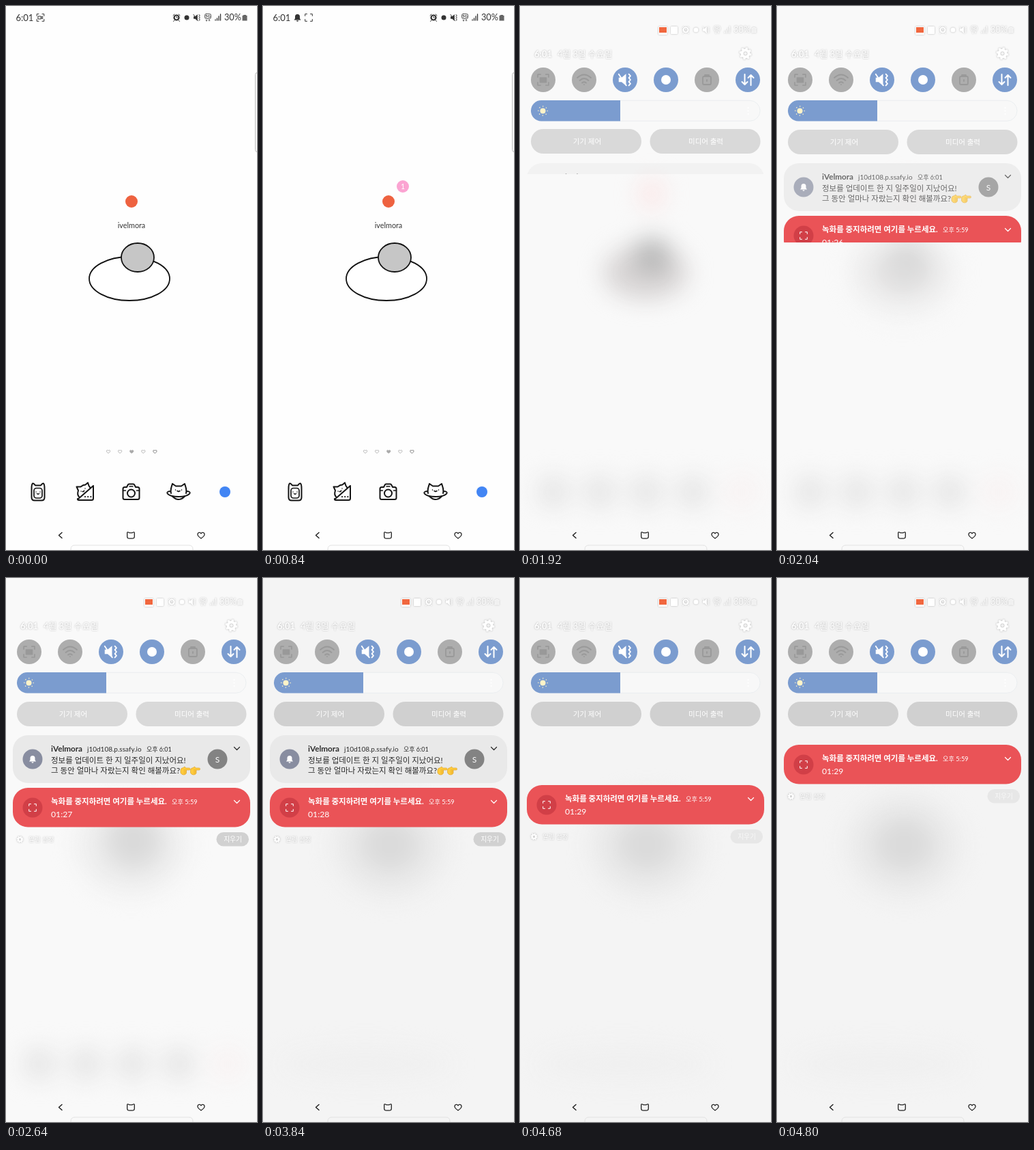
Recreate the animation shown at these times as an HTML page. Size 368 px wide and 796 px high, loop 4920 ms.

```html
<!DOCTYPE html>
<html lang="ko">
<head>
<meta charset="utf-8">
<style>
  html, body { margin: 0; height: 100%; overflow: hidden; background: #fefefe; }
  svg { display: block; width: 100vw; height: 100vh; }
  text { font-family: Lato, "Noto Sans CJK KR", sans-serif; fill: currentColor; }
  .line { fill: none; stroke: currentColor; stroke-linecap: round; stroke-linejoin: round; }
  .fill { fill: currentColor; }
  .mid { text-anchor: middle; }
  .pale { color: #fff; filter: drop-shadow(0 0 1px #b0b0b0); }
  .soft { filter: blur(17px); }
</style>
</head>
<body>
<svg viewBox="0 0 368 796">
  <defs>
    <path id="heart" d="M0 4.500C-4 2-5.500.5-5-2C-4.300-4.800-1-4.500 0-2.500C1-4.500 4.300-4.800 5-2C5.500.5 4 2 0 4.500z"/>
    <path id="bell" class="fill" d="M-5 3.500h10l-1.500-2.300v-2.700a3.500 3.500 0 0 0-7 0v2.700zM-1.500 4.200h3a1.500 1.500 0 0 1-3 0z"/>
    <path id="corners" class="line" d="M-5.300-2.500v-2.800h2.800M2.500-5.300h2.800v2.800M5.300 2.500v2.800h-2.800M-2.500 5.300h-2.800v-2.800"/>
    <path id="camera" class="line" d="M-3.200-2h4v4h-4zM.8-.5l2.400-1.300v3.600l-2.400-1.300"/>
    <g id="mute">
      <path class="fill" d="M-5-1.700h2.300l3.500-3v9.400l-3.500-3h-2.300z"/>
      <path class="line" d="M-5-4.500L1 4.500M3-4.500l1.300 1.500-1.300 1.500 1.300 1.500-1.300 1.500 1.300 1.500-1.300 1.500"/>
    </g>
    <g id="gear" fill="none" stroke="currentColor">
      <circle r="7.500" stroke-width="3" stroke-dasharray="3 2.890"/>
      <circle r="5" stroke-width="4"/>
    </g>
    <g id="hand" fill="#ffcb3d" stroke="#d99b22" stroke-width=".6">
      <path d="M0 4Q0 1 4 .5L6-1l1.500 2h5q1.500 0 1.500 1.500t-1.500 1.500h-4v4.500q-1 2.500-4 2.500T0 8z"/>
      <path d="M4.500 4h4M4.500 6.200h4M4.500 8.400h3.700"/>
    </g>
    <path id="chevron" class="line" d="M-4-2l4 4 4-4" stroke-width="1.200"/>
    <g id="status">
      <circle class="line" r="3.500" stroke-width="2.200"/>
      <path class="line" d="M0-1.500v1.500h1.200M-5-3l2-2M5-3l-2-2M-3 4l-1.500 1.500M3 4l1.500 1.500"/>
      <circle class="fill" cx="15" r="3.500"/>
      <use href="#mute" x="30"/>
      <rect class="line" x="41.500" y="-5.500" width="9" height="7" rx="2" stroke-width=".8"/>
      <text class="mid" x="46" y=".3" font-size="6" font-weight="700">5G</text>
      <path class="line" d="M44 3v2m-1-1l1 1 1-1M48 5v-2m-1 1l1-1 1 1" stroke-width=".7"/>
      <path class="line" d="M57 4v-1M59.500 4v-3M62 4v-6M64.500 4v-9" stroke-width="1.300"/>
      <text x="70" y="4" font-size="12.700">30%</text>
      <path class="fill" d="M98-4h4v1h1.500v7.500h-7v-7.500h1.500z" opacity=".75"/>
    </g>
    <clipPath id="track"><rect x="16" y="138" width="336" height="30.500" rx="15.250"/></clipPath>
    <clipPath id="reveal"><rect id="revealBox" width="368" height="796"/></clipPath>
  </defs>

  <g id="home" color="#333">
    <text x="14.500" y="21.500" font-size="13">6:01</text>
    <use id="statusBell" href="#bell" x="50.500" y="17"/>
    <g id="recorder"><use href="#corners"/><use class="blink" href="#camera"/></g>
    <use href="#status" x="250" y="17"/>
    <rect x="365.500" y="97.500" width="9" height="116" rx="3" fill="#fafafa" stroke="#bbb"/>

    <circle cx="184" cy="286" r="9" fill="#ee6240"/>
    <g id="badge">
      <circle cx="205" cy="264" r="9" fill="#fba4d2"/>
      <text class="mid" x="205" y="268" font-size="10.500" style="fill:#fff">1</text>
    </g>
    <text class="mid" x="184" y="324.500" font-size="10.800">ivelmora</text>
    <ellipse cx="181" cy="399" rx="59" ry="32" fill="#fff" stroke="#111" stroke-width="1.800"/>
    <ellipse cx="193" cy="368" rx="24" ry="21" fill="#c6c6c6" stroke="#111" stroke-width="1.800"/>
    <g id="pages" fill="none" stroke="#aaa" stroke-width="1.600"></g>

    <g class="line" color="#151515" stroke-width="2">
      <g transform="translate(47 711)">
        <path d="M-9.500-5C-9.500-9-9-12-7.500-12.500Q-5.500-12-4-9.500h8Q5.500-12 7.500-12.500C9-12 9.500-9 9.500-5V8q0 4.500-4.500 4.500h-10q-4.500 0-4.500-4.500z"/>
        <rect x="-6" y="-5.500" width="12" height="14.500" rx="3.500" stroke-width="1.700"/>
        <path d="M-3 0v.1M3 0v.1M-1.500 2.500l1.500 1 1.500-1" stroke-width="1.500"/>
      </g>
      <g transform="translate(116 711)">
        <path d="M-11 11L12-9V9.500q0 2.500-2.500 2.500h-19q-2 0-1.500-2zM-9 7C-12 4-11 1-10-2L-12.500-7.500l6 0Q-3-10.500.5-10.500L4-13.500 5.500-9 7.500-6"/>
        <path d="M0 7v.1M4.200 7v.1M8.400 7v.1" stroke-width="2.200"/>
        <path d="M-6-1v.1M0-5v.1M-4-.5l2 0 .5-1.500" stroke-width="1.500"/>
      </g>
      <g transform="translate(183.500 711)">
        <path d="M-12-4.500q0-2.500 2.500-2.500h3l1.500-3q.7-1.500 2-1.500h6q1.300 0 2 1.500l1.500 3h3q2.500 0 2.500 2.500v13q0 2.500-2.500 2.500h-19q-2.500 0-2.500-2.500z"/>
        <circle cy="2" r="5.500"/>
        <path d="M-2.500-8h5M-12-2h4M8-2h4" stroke-width="1.500"/>
      </g>
      <g transform="translate(253 711)">
        <path d="M-11 2C-12.500-4-10-8-9-12l5 3.500h8l5-3.500C10-8 12.500-4 11 2M-9 6.500q9 9 18 0"/>
        <path d="M-12-1C-21-1-17 7 0 7S21-1 12-1" stroke-width="1.800"/>
        <path d="M-4.500-3v.1M4.500-3v.1M-2-1.500l2 1 2-1" stroke-width="1.600"/>
      </g>
    </g>
    <circle cx="321" cy="711" r="8" fill="#4285f4"/>
  </g>

  <g id="panel">
    <rect width="368" height="796" fill="#f9f9f9"/>
    <g id="blurEarly" class="soft">
      <ellipse cx="184" cy="390" rx="62" ry="40" fill="#d8d5d5"/>
      <ellipse cx="194" cy="366" rx="28" ry="27" fill="#b8b8b8"/>
      <ellipse cx="193" cy="275" rx="17" ry="22" fill="#fbe5e5"/>
    </g>
    <g id="blurMid" class="soft">
      <ellipse cx="184" cy="390" rx="80" ry="72" fill="#ededed"/>
      <ellipse cx="187" cy="384" rx="40" ry="40" fill="#d9d9d9"/>
    </g>
    <g id="blurDock" class="soft"></g>
    <g id="blurLate">
      <rect width="368" height="796" fill="#f4f4f4"/>
      <g class="soft">
        <ellipse cx="186" cy="392" rx="82" ry="74" fill="#e9e9e9"/>
        <ellipse cx="186" cy="390" rx="42" ry="38" fill="#dadada"/>
        <ellipse cx="150" cy="711" rx="125" ry="22" fill="#efefef"/>
      </g>
    </g>

    <g class="pale">
      <rect x="203" y="30" width="13" height="12" rx="1" class="fill"/>
      <rect x="221" y="30" width="10" height="11" rx="1" class="fill"/>
      <use href="#status" x="243" y="35"/>
      <text x="21" y="74.500" font-size="13" font-weight="700">6:01</text>
      <text x="55" y="74.500" font-size="12.800" font-weight="500">4월 3일 수요일</text>
      <use href="#gear" x="330.500" y="69.500"/>
    </g>
    <rect x="204" y="31" width="11" height="8" fill="#f1673f"/>

    <g id="toggles"></g>
    <g color="#999" class="line" stroke-width="1.800">
      <g transform="translate(34 108) scale(1.500)" stroke-width="1.100"><use href="#corners"/><rect x="-3" y="-2" width="6" height="4.500" class="fill"/></g>
      <path d="M84 105q10-9 20 0M87.500 109q6.500-6 13 0M91 112.500q3-2.500 6 0M94 115v.1"/>
      <rect x="268" y="103" width="12" height="12" rx="2"/>
      <path d="M271 103v-2h6v2M274 108v2"/>
    </g>
    <g color="#fff">
      <use href="#mute" transform="translate(154 108) scale(1.850)"/>
      <circle cx="214" cy="108" r="7" class="fill"/>
      <path class="line" d="M329.500 100v15m-4-4l4 4 4-4M338.500 116v-15m-4 4l4-4 4 4" stroke-width="2"/>
    </g>

    <g clip-path="url(#track)">
      <rect x="16" y="138" width="336" height="31" fill="#f8f8f8"/>
      <rect x="16" y="138" width="131" height="31" fill="#7b9ccf"/>
    </g>
    <path d="M147 138.300h190a15 15 0 0 1 0 30h-190" fill="none" stroke="#e8ebee" stroke-width=".8"/>
    <g color="#fff3c8">
      <circle cx="33.500" cy="153.500" r="4" class="fill"/>
      <circle cx="33.500" cy="153.500" r="6.700" class="line" stroke-width="1.500" stroke-dasharray=".1 5.162"/>
    </g>
    <path class="line" d="M334.500 149v.1M334.500 153.500v.1M334.500 158v.1" color="#fff" stroke-width="2"/>

    <g id="buttons" color="#fff" font-size="10.500">
      <rect x="16" y="180" width="162" height="36" rx="18"/>
      <rect x="190.500" y="180" width="162" height="36" rx="18"/>
      <text class="mid" x="98.500" y="202">기기 제어</text>
      <text class="mid" x="272.500" y="202">미디어 출력</text>
    </g>

    <g clip-path="url(#reveal)">
      <g id="message" color="#2b2b2b">
        <rect x="10" y="230" width="348" height="70" rx="22" fill="#e9e9e9"/>
        <circle cx="39" cy="265" r="14.500" fill="#888da0"/>
        <use href="#bell" x="39" y="265" color="#fff"/>
        <text x="66" y="253.500" font-size="11.700" font-weight="700">iVelmora</text>
        <text x="119" y="253.500" font-size="10">j10d108.p.ssafy.io</text>
        <text x="206" y="253.500" font-size="9">오후 6:01</text>
        <text x="66" y="270.500" font-size="11.500">정보를 업데이트 한 지 일주일이 지났어요!</text>
        <text x="66" y="285.500" font-size="11.500">그 동안 얼마나 자랐는지 확인 해볼까요?</text>
        <use href="#hand" x="256" y="277"/><use href="#hand" x="270.500" y="277"/>
        <circle cx="310" cy="265" r="14.500" fill="#838383"/>
        <text class="mid" x="310" y="269.500" font-size="12" style="fill:#fff">S</text>
        <use href="#chevron" x="338.500" y="249.500"/>
      </g>
      <g id="lower" color="#fff">
        <rect x="10" y="307" width="348" height="57.500" rx="22" fill="#ea5357"/>
        <circle cx="39" cy="336" r="14.500" fill="#d13f47"/>
        <g transform="translate(39 336)"><use href="#corners"/><use class="blink" href="#camera"/></g>
        <text x="66" y="331" font-size="11.500" font-weight="700">녹화를 중지하려면 여기를 누르세요.</text>
        <text x="243" y="331" font-size="9.200">오후 5:59</text>
        <text id="timer" x="66" y="349.500" font-size="12.200"></text>
        <use href="#chevron" x="338.500" y="327.500"/>
        <g class="pale">
          <use href="#gear" transform="translate(20.500 382.500) scale(.55)"/>
          <text x="33" y="386" font-size="9.500">알림 설정</text>
        </g>
        <g id="clear">
          <rect x="308.500" y="372" width="47.500" height="20.500" rx="10.250" fill="#d1d1d1"/>
          <text class="mid" x="332.500" y="386" font-size="9.700">지우기</text>
        </g>
      </g>
    </g>
  </g>

  <g color="#222" class="line" stroke-width="1.500">
    <path d="M82 770.500l-4.500 4 4.500 4"/>
    <path d="M177.700 771q0-1.600 1.500-1l2 .8h3.600l2-.8q1.500-.6 1.500 1v5q0 3.200-3.200 3.200h-4.200q-3.200 0-3.200-3.200z" stroke-width="1.300"/>
    <use href="#heart" x="286" y="774.500" stroke-width="1.300"/>
    <path d="M95 798v-3q0-6 6-6h167q6 0 6 6v3" stroke="#e2e2e2" stroke-width="1"/>
  </g>
</svg>
<script>
const LOOP = 4920, STEP = 120;
const $ = id => document.getElementById(id);
const ramp = (t, from, to) => Math.min(1, Math.max(0, (t - from) / (to - from)));
const within = (t, spans) => spans.some(([from, to]) => t >= from && t < to);
const show = (el, on) => el.style.display = on ? "" : "none";
const fade = (id, amount) => $(id).setAttribute("opacity", amount);
const move = (id, x, y) => $(id).setAttribute("transform", `translate(${x} ${y})`);

const cameraOn = [[0, 120], [360, 600], [1320, 1680], [2160, 2400], [3000, 3480], [3960, 4320]];

$("pages").innerHTML = [0, 1, 2, 3, 4].map(i =>
  `<use href="#heart" transform="translate(${150 + i * 17.1} 652) scale(.52)"
    ${i === 2 ? 'fill="#aaa"' : i === 4 ? 'stroke="#666"' : ""}/>`).join("");
$("toggles").innerHTML = [0, 0, 1, 1, 0, 1].map((on, i) =>
  `<circle cx="${34 + i * 60}" cy="108" r="18" fill="${on ? "#7b9ccf" : "#adadad"}"/>`).join("");
$("blurDock").innerHTML = [49, 117, 185, 253, 325].map((x, i) =>
  `<circle cx="${x}" cy="711" r="24" fill="${i < 4 ? "#e5e5e5" : "#f8f2f2"}"/>`).join("");

function draw(t) {
  const open = t >= 1920, notified = t >= 360;
  show($("home"), !open);
  show($("panel"), open);
  document.querySelectorAll(".blink").forEach(el => show(el, within(t, cameraOn)));
  show($("statusBell"), notified);
  show($("badge"), notified);
  move("recorder", notified ? 67 : 50.500, 17);

  const opening = ramp(t, 1920, 2160), late = ramp(t, 2760, 3120);
  fade("blurEarly", 1 - opening);
  fade("blurMid", opening);
  fade("blurLate", late);
  move("buttons", 0, t < 2040 ? 0 : 1);
  $("buttons").setAttribute("fill", late < 1 ? "#d9d9d9" : "#d0d0d0");
  $("revealBox").setAttribute("height", opening < 1 ? 246 + 200 * opening : 796);

  const swipe = ramp(t, 4320, 4680);
  move("message", 368 * swipe ** 1.5, 0);
  fade("message", (.4 + .6 * opening) * (1 - swipe * .6));
  move("lower", 0, t < 4680 ? 0 : t < 4800 ? -4 : -63);
  fade("clear", 1 - .65 * ramp(t, 4440, 4680));
  $("timer").textContent = "01:" + (26 + [2640, 3480, 4320].filter(at => t >= at).length);
}

function tick() {
  const t = performance.now() % LOOP;
  draw(Math.floor(t / STEP) * STEP);
  requestAnimationFrame(tick);
}
tick();
</script>
</body>
</html>
```
